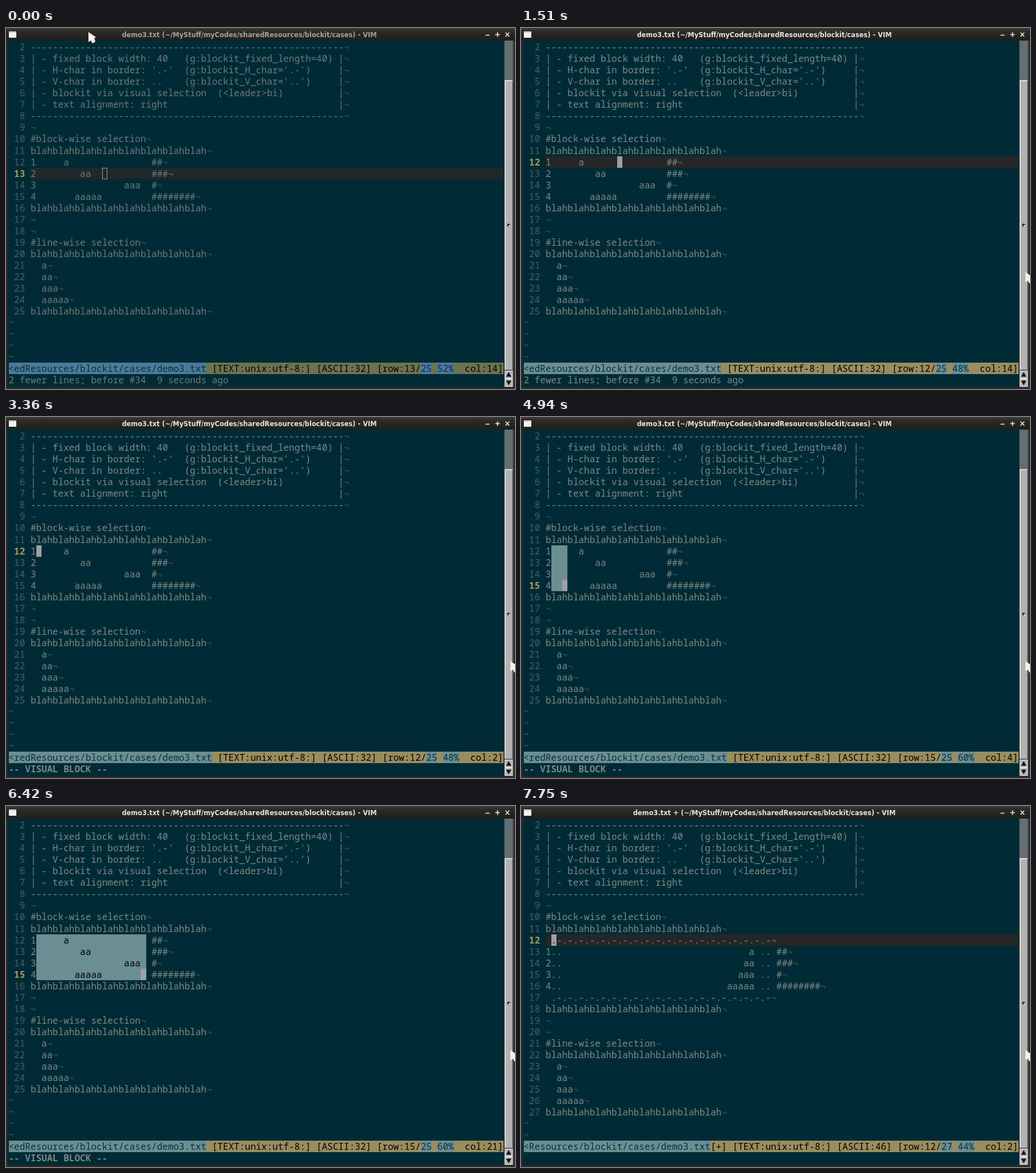
An HTML page that plays this animation: 889x630 px, repeating every 8000 ms.

```html
<!DOCTYPE html>
<html lang="en">
<head>
<meta charset="utf-8">
<title>Block selection in a text editor</title>
<style>
html, body { margin: 0; width: 100%; height: 100%; overflow: hidden; background: #2b2b27; }
#win { position: relative; width: 889px; height: 630px; overflow: hidden; background: #2b2b27; }
#bar { position: absolute; inset: 0 0 auto; height: 22px; background: linear-gradient(#3c3b37, #2b2a26 30%, #1f1e1b); }
#name { position: absolute; left: 0; width: 850px; top: 0; text-align: center; white-space: pre;
  font: bold 11.4px/24px "DejaVu Sans", sans-serif; color: #e4e2da; }
#back { position: absolute; left: 3px; top: 22px; width: 867px; height: 605px; background: #002b36; }
#text { --row: 20.06px; position: absolute; left: 4.5px; top: 23.1px; color: #7d8884;
  font: 16px/var(--row) "Noto Sans Mono", monospace; font-variant-ligatures: none; }
#text div { height: var(--row); white-space: pre; }
#text span { display: inline-block; height: var(--row); vertical-align: top; white-space: pre; }
#text .num, #text .tilde { color: #4a5e64; }
#text .here { color: #a8965f; font-weight: bold; }
#text .eol { color: #42565c; }
#text .line { background: #262626; }
#text .line.eol { color: #68706c; }
#text .sel { background: #6b8e93; color: #000; }
#text .cur { background: #9da19f; color: #10282d; }
#text .file { background: #6b8e93; color: #05303c; }
#text .info { background: #998d60; color: #000; }
#text .bold { font-weight: bold; }
.blur #name { color: #a3a29a; }
.idle #text { color: #6c7a77; }
.idle #text .line { background: #1f282b; }
.idle #text .cur { background: #1f282b; box-shadow: inset 0 0 0 1px #93a1a1; }
.idle #text .file { background: #4b7a9b; }
.idle #text .info { background: #6d7250; }
svg { position: absolute; left: 0; top: 0; }
</style>
</head>
<body>
<div id="win">
  <div id="bar"></div>
  <div id="name"></div>
  <div id="back"></div>
  <div id="text"></div>
  <svg width="889" height="630">
    <defs>
      <pattern id="mesh" width="2" height="2" patternUnits="userSpaceOnUse">
        <path fill="#2c3a40" d="M0 0h2v2h-2z"/>
        <path fill="#9aa3a6" d="M0 0h1v1h-1zM1 1h1v1h-1z"/>
      </pattern>
    </defs>
    <rect x="5" y="6" width="13" height="11" fill="#f2f2ee"/>
    <path d="M5 7.5h13" stroke="#b9b9b4"/>
    <path d="M837.5 12.5h7M854.5 11.5h8M858.5 7.5v8M872.5 8l6.5 7M879 8l-6.5 7" stroke="#f0eee6" stroke-width="1.6"/>
    <rect x="870" y="22" width="17" height="605" fill="#444"/>
    <rect x="871" y="22" width="14" height="69" fill="url(#mesh)"/>
    <rect x="871" y="91" width="14" height="506" fill="#b2b2b2"/>
    <path d="M871.7 597V91.7H885" fill="none" stroke="#eee" stroke-width="1.4"/>
    <path d="M884.5 92V596.5H872" fill="none" stroke="#777"/>
    <circle cx="878" cy="344" r="2.6" fill="#111"/>
    <circle cx="879" cy="345" r="1.5" fill="#f4f4f4"/>
    <g stroke="#eee">
      <path d="M871.5 598.5h13v13h-13zM871.5 612.5h13v13h-13z" fill="#b2b2b2"/>
      <path d="M878 600.5l4.5 8h-9zM878 623.5l4.5-8h-9z" fill="#111" stroke="none"/>
    </g>
    <path id="mouse" d="M0 0L13 9L10.500 11L12 17L7 20L4.500 15L0 17.500Z" fill="#f6f1e7"/>
  </svg>
</div>
<script>
const $ = id => document.getElementById(id);
const LOOP = 8000, COLS = 90, FIRST = 2;
const PATH = '~/MyStuff/myCodes/sharedResources/blockit/cases/demo3.txt';
const blah = 'blah'.repeat(8), dashes = '-'.repeat(57);
const boxed = s => ('| - ' + s).padEnd(56) + '|';

const items = [[6, 1, 2], [9, 2, 3], [17, 3, 1], [8, 5, 8]];  // column, letters, hashes
const loose = items.map(([at, n, h], i) =>
  ((i + 1 + '').padEnd(at) + 'a'.repeat(n)).padEnd(22) + '#'.repeat(h));
const edge = ' ' + '.-'.repeat(20);
const framed = [edge, ...items.map(([, n, h], i) =>
  i + 1 + '..' + 'a'.repeat(n).padStart(35) + ' .. ' + '#'.repeat(h)), edge];

const page = block => [
  dashes,
  boxed('fixed block width: 40   (g:blockit_fixed_length=40)'),
  boxed("H-char in border: '.-'  (g:blockit_H_char='.-')"),
  boxed("V-char in border: ..    (g:blockit_V_char='..')"),
  boxed('blockit via visual selection  (<leader>bi)'),
  boxed('text alignment: right'),
  dashes, '', '#block-wise selection', blah, ...block, blah, '', '',
  '#line-wise selection', blah, '  a', '  aa', '  aaa', '  aaaaa', blah
];
const before = page(loose), after = page(framed);

// time, row, column, mode
const moves = [
  [0, 13, 14, 'normal'], [1510, 12, 14, 'normal'], [2450, 12, 1, 'normal'], [2770, 12, 2, 'normal'],
  [3360, 12, 2, 'visual'], [3670, 13, 2, 'visual'], [3850, 14, 2, 'visual'], [4100, 15, 2, 'visual'],
  [4770, 15, 3, 'visual'], [4940, 15, 4, 'visual'], [5580, 15, 23, 'visual'], [6050, 15, 22, 'visual'],
  [6420, 15, 21, 'visual'], [7710, 12, 2, 'done']
];

const escapeText = s => s.replace(/&/g, '&amp;').replace(/</g, '&lt;');

function drawText([, row, col, mode]) {
  const lines = mode === 'done' ? after : before;
  const last = lines.length + FIRST - 1;
  const grid = Array.from({ length: 30 }, () => Array.from({ length: COLS }, () => [' ', '']));
  const put = (y, x, s, cls) => [...s].forEach((ch, i) => grid[y][x + i] = [ch, cls]);
  const tint = (y, from, to, cls) => { for (let x = from; x < to; x++) grid[y][x][1] = cls(grid[y][x][1]); };

  lines.forEach((s, y) => {
    const n = y + FIRST;
    put(y, 0, (n + '').padStart(3), n === row ? 'here' : 'num');
    put(y, 4, s, '');
    put(y, 4 + s.length, '¬', 'eol');
    if (n === row && mode !== 'visual') tint(y, 4, COLS, c => 'line ' + c);
    if (mode === 'visual' && n >= 12 && n <= row) tint(y, 5, 4 + col, () => 'sel');
  });
  for (let y = lines.length; y < 28; y++) put(y, 0, '~', 'tilde');
  tint(row - FIRST, 3 + col, 4 + col, () => 'cur');

  const code = grid[row - FIRST][3 + col][0].charCodeAt(0);
  const tail = [
    [(mode === 'done' ? '[+]' : '') + ` [TEXT:unix:utf-8:] [ASCII:${code}] [row:${row}/`, 'info'],
    [last + '', 'file'], [' ', 'info'], [Math.floor(row * 100 / last) + '%', 'file'],
    [`  col:${col}]`, 'info']
  ];
  const room = COLS - tail.reduce((sum, [s]) => sum + s.length, 0);
  let x = 0;
  for (const [s, cls] of [['<' + PATH.slice(1 - room), 'file'], ...tail]) {
    put(28, x, s, cls);
    x += s.length;
  }
  if (mode === 'visual') put(29, 0, '-- VISUAL BLOCK --', 'bold');
  if (mode === 'normal') put(29, 0, '2 fewer lines; before #34  9 seconds ago', '');

  $('text').innerHTML = grid.map(cells => {
    const runs = [];
    for (const [ch, cls] of cells) {
      const run = runs[runs.length - 1];
      if (run && run.cls === cls) run.s += ch;
      else runs.push({ s: ch, cls });
    }
    return '<div>' + runs.map(r => `<span class="${r.cls}">${escapeText(r.s)}</span>`).join('') + '</div>';
  }).join('');
}

let shown;
function frame(now) {
  const t = now % LOOP;
  const move = moves.filter(m => m[0] <= t).pop();
  if (move !== shown) drawText(shown = move);
  $('name').textContent = `demo3.txt ${t >= 7750 ? '+ ' : ''}(~/MyStuff/myCodes/sharedResources/blockit/cases) - VIM`;
  $('win').className = (t < 170 ? 'blur ' : '') + (t < 220 ? 'idle' : '');
  const k = t < 360 ? 0 : Math.min(5, Math.floor((t - 360) / 40) + 1) / 5;
  $('mouse').setAttribute('transform', `translate(${144 + 737 * k} ${7 + 419 * k})`);
  requestAnimationFrame(frame);
}
frame(0);
</script>
</body>
</html>
```
